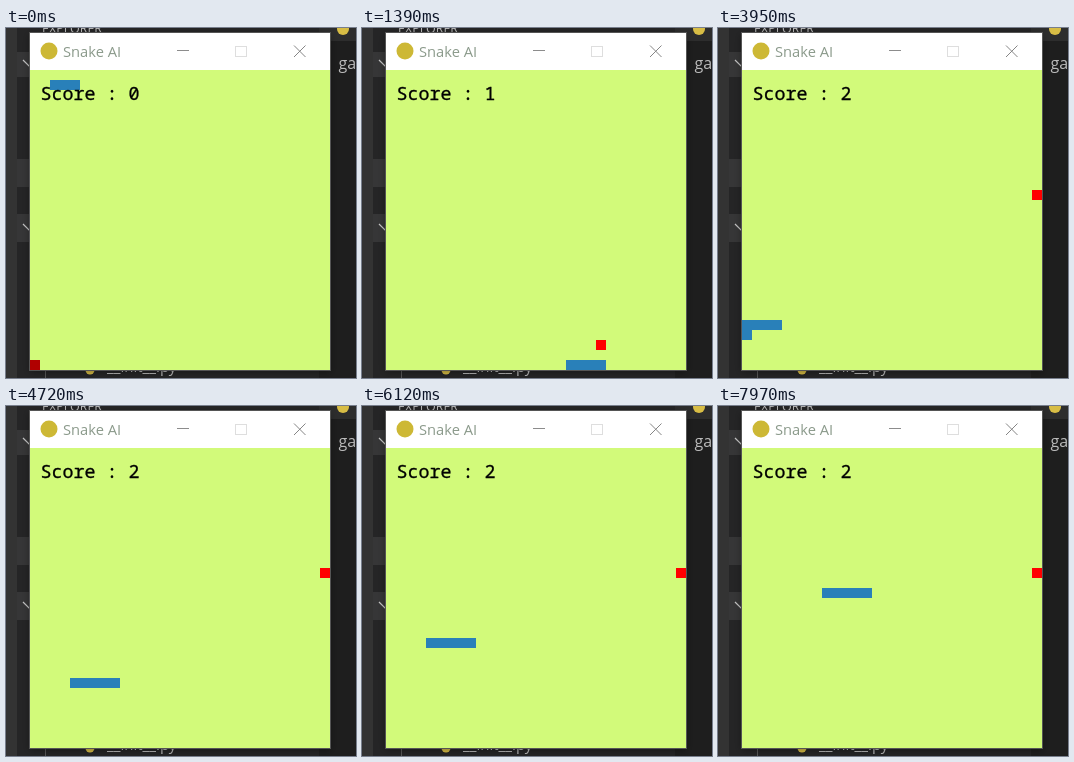
An HTML page that plays this animation: 350x350 px, repeating every 8 s.

```html
<!DOCTYPE html>
<html lang="en">
<head>
<meta charset="utf-8">
<title>Snake AI</title>
<style>
  html, body { margin: 0; width: 100%; height: 100%; overflow: hidden; background: #1e1e1e; }
  svg { display: block; width: 350px; height: 350px; }
  text { white-space: pre; }
  .ui { font-family: "Open Sans", "Noto Sans", sans-serif; }
  .score { font: 18.33px "Noto Sans Mono", "DejaVu Sans Mono", monospace; stroke: #000; stroke-width: .3; }
</style>
</head>
<body>
<svg viewBox="0 0 350 350">
  <defs>
    <filter id="shadow" x="-10%" y="-10%" width="120%" height="120%">
      <feDropShadow dx="0" dy="2" stdDeviation="4" flood-opacity=".4"/>
    </filter>
  </defs>

  <!-- editor behind the game window -->
  <rect width="350" height="350" fill="#1e1e1e"/>
  <rect width="313" height="350" fill="#252526"/>
  <rect width="11" height="350" fill="#333"/>
  <rect x="313" width="37" height="13" fill="#2d2d2d"/>
  <g fill="#363637">
    <rect x="11" y="24" width="302" height="25"/>
    <rect x="11" y="131" width="302" height="28"/>
    <rect x="11" y="186" width="302" height="28"/>
  </g>
  <path d="M17 32l7 7 7-7M17 196l7 7 7-7" fill="none" stroke="#c5c5c5" stroke-width="1.2"/>
  <path d="M39.5 214V350" stroke="#585858"/>
  <g class="ui" fill="#bbb">
    <text x="36" y="4.5" font-size="12.5">EXPLORER</text>
    <text x="101" y="344" font-size="15">__init__.py</text>
    <text x="332.5" y="41" font-size="16">game</text>
  </g>
  <g fill="#d8bd45">
    <circle cx="84" cy="342" r="4.5"/>
    <circle cx="337" cy="1" r="6"/>
  </g>

  <!-- game window -->
  <rect x="24" y="5" width="300" height="337" fill="#fff" filter="url(#shadow)"/>
  <rect x="23.5" y="4.5" width="301" height="338" fill="none" stroke="#555"/>
  <circle cx="43" cy="23" r="8.5" fill="#cdb835"/>
  <text class="ui" x="57" y="29" font-size="14.7" fill="#8b9a8b">Snake AI</text>
  <g fill="none">
    <path d="M171 22.5h12" stroke="#8c8c8c"/>
    <rect x="229.5" y="18.5" width="11" height="10" stroke="#dedede"/>
    <path d="M288 17.5l11.5 11.5M299.5 17.5l-11.5 11.5" stroke="#858585"/>
  </g>
  <rect x="24" y="42" width="300" height="300" fill="#d2fa7a"/>
  <g shape-rendering="crispEdges">
    <path id="food"/>
    <path id="snake" fill="#2980b9"/>
  </g>
  <text id="score" class="score" x="34.5" y="72"></text>
</svg>
<script>
  const LOOP = 8000;
  const FRAME = 77.2;
  const CELL = 10;
  const LAST = 29; // index of the last row and column
  const START_LENGTH = 3;

  let x = 4, y = 1;
  const route = [[x, y]];

  function goTo(col, row) {
    while (x !== col || y !== row) {
      x += Math.sign(col - x);
      y += Math.sign(row - y);
      route.push([x, y]);
    }
  }

  // Cross to the opposite wall, then climb one row.
  function sweep(times) {
    for (; times > 0; times--) {
      goTo(LAST - x, y);
      goTo(x, y - 1);
    }
  }

  // Down to the first food, back and forth to the second.
  goTo(0, y);
  goTo(0, LAST);
  sweep(2);
  goTo(21, y);
  // Double back to the corner, then climb the whole board.
  goTo(x, y + 1);
  goTo(x - 1, y);
  goTo(x, LAST);
  goTo(0, LAST);
  goTo(0, y - 1);
  sweep(2);
  goTo(0, y - 1);
  sweep(12);

  // Eating at a travelled distance adds a cell and a point.
  const foods = [
    { cell: [0, LAST], color: "#b00000", eatenAt: 30 },
    { cell: [21, 27], color: "#f00", eatenAt: 111 },
    { cell: [LAST, 12], color: "#f00", eatenAt: Infinity },
  ];

  // The snake speeds up, then runs steadily: [frame, cells travelled]
  const pace = [[0, 0], [18, 51], [33, 111], [35, 113], [51, 199], [70, 323], [103, 547]];

  function travelled(frame) {
    const next = Math.max(1, pace.findIndex(key => key[0] >= frame));
    const [f0, d0] = pace[next - 1], [f1, d1] = pace[next];
    return Math.round(d0 + (d1 - d0) * (frame - f0) / (f1 - f0));
  }

  const square = ([col, row]) =>
    `M${24 + col * CELL} ${42 + row * CELL}h${CELL}v${CELL}h${-CELL}z`;
  const [foodEl, snakeEl, scoreEl] =
    ["food", "snake", "score"].map(id => document.getElementById(id));

  function draw(time) {
    const distance = travelled(Math.floor(time % LOOP / FRAME));
    const score = foods.filter(food => distance >= food.eatenAt).length;
    const head = distance + START_LENGTH;
    const body = route.slice(head - START_LENGTH - score, head);
    snakeEl.setAttribute("d", body.map(square).join(""));
    foodEl.setAttribute("d", square(foods[score].cell));
    foodEl.setAttribute("fill", foods[score].color);
    scoreEl.textContent = `Score : ${score}`;
  }

  const start = performance.now();
  function tick() {
    draw(performance.now() - start);
    requestAnimationFrame(tick);
  }
  tick();
</script>
</body>
</html>
```
